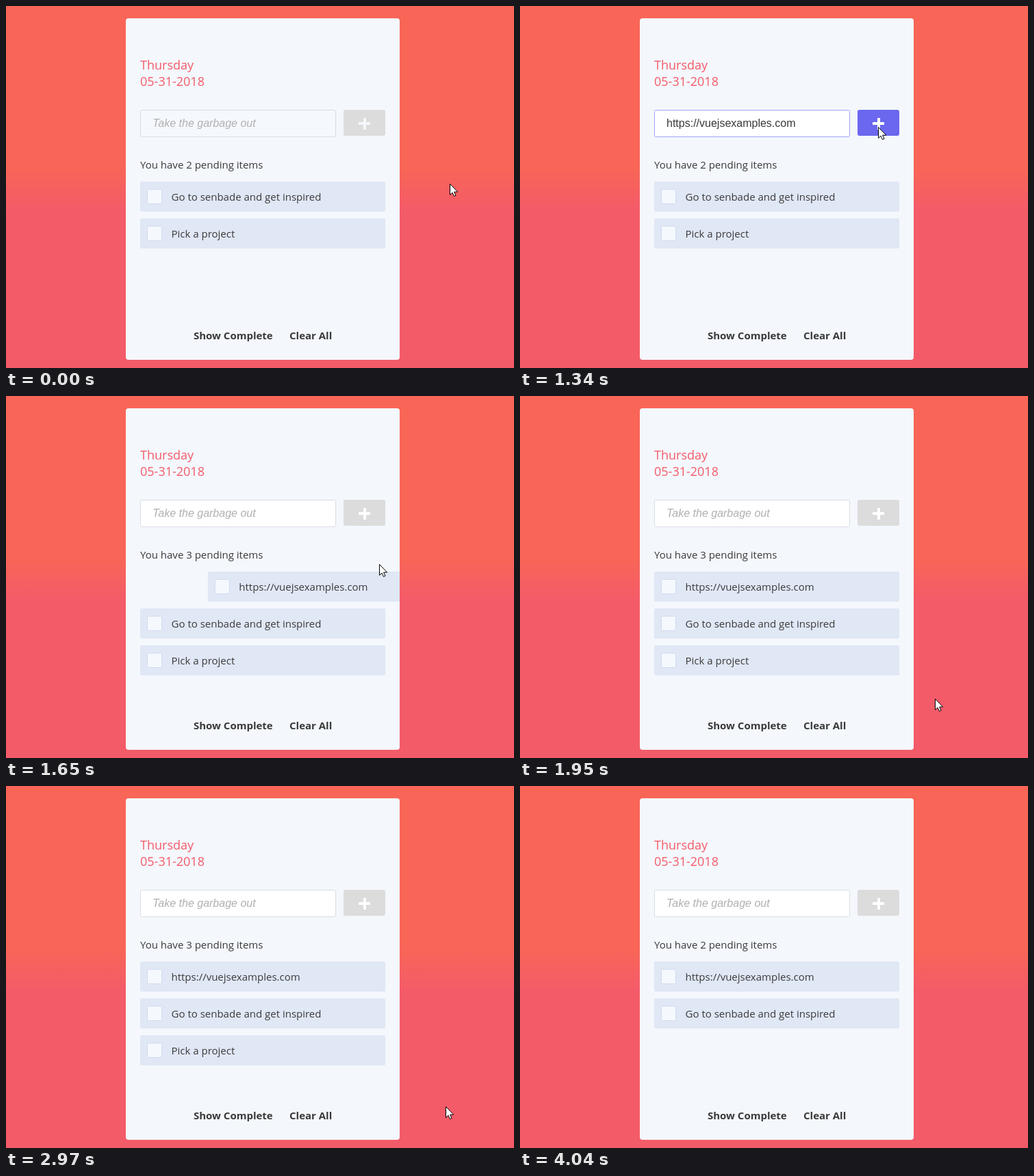
Write an HTML page with a canvas that moves like this. It is 742x530 px and loops after 4.19 s.

```html
<!DOCTYPE html>
<html lang="en">
<head>
<meta charset="utf-8">
<title>To-do list</title>
<style>
  html, body { margin: 0; width: 100%; height: 100%; overflow: hidden; }
  canvas { display: block; }
</style>
</head>
<body>
<canvas id="stage" width="742" height="530"></canvas>
<script>
const ctx = document.getElementById('stage').getContext('2d');
const CARD = '#f4f7fc', INK = '#3a3a3a', ROSE = '#f45b69';
const SANS = '"Open Sans", sans-serif', INPUT = '"Liberation Sans", Arial, sans-serif';

// Timing in ms: the picture rests for START, then refreshes once per STEP.
const LOOP = 4190, START = 280, STEP = 149;
const FOCUS = 570, PASTE = 1020, ADD = 1470, SETTLE = 1620, HOVER = 3250, REMOVE = 3400, GONE = 3700;

// Pointer stops: time, x, y
const STOPS = [[0, 648, 260], [START - STEP, 648, 260], [FOCUS, 432, 176], [876, 525, 183],
  [ADD, 523, 176], [1919, 606, 443], [2366, 620, 498], [2515, 685, 525], [2813, 682, 500],
  [HOVER, 534, 386], [REMOVE + STEP, 534, 386], [4000, 740, 560], [LOOP, 740, 560]];

const clamp = v => Math.min(1, Math.max(0, v));
const progress = (t, from, to) => clamp((t - from) / (to - from));
const within = (t, from, to) => t >= from && t < to;

function pointerAt(t) {
  const i = STOPS.findIndex(stop => stop[0] > t);
  const [t0, x0, y0] = STOPS[i - 1], [t1, x1, y1] = STOPS[i];
  const u = progress(t, t0, t1), eased = u * u * (3 - 2 * u);
  return [x0 + (x1 - x0) * eased, y0 + (y1 - y0) * eased];
}

function box(x, y, w, h, radius, fill, stroke) {
  const inset = stroke ? 0.5 : 0;
  ctx.beginPath();
  ctx.roundRect(x + inset, y + inset, w - 2 * inset, h - 2 * inset, radius);
  ctx.fillStyle = fill;
  ctx.fill();
  if (stroke) {
    ctx.strokeStyle = stroke;
    ctx.stroke();
  }
}

function text(str, x, y, font, color = INK) {
  ctx.font = font;
  ctx.fillStyle = color;
  ctx.fillText(str, x, y);
}

function background() {
  const sky = ctx.createLinearGradient(0, 238, 0, 300);
  sky.addColorStop(0, '#f96557');
  sky.addColorStop(1, ROSE);
  ctx.fillStyle = sky;
  ctx.fillRect(0, 0, 742, 530);
  box(175, 18, 400, 500, 4, CARD);
}

function form(t) {
  const focused = within(t, FOCUS, ADD);
  const filled = within(t, PASTE, ADD);
  const active = within(t, PASTE, SETTLE);
  box(196, 152, 286, 40, 2, t < FOCUS ? '#f5f8fd' : '#fff', focused ? '#a1a6f2' : '#d9dce2');
  if (filled) text('https://vuejsexamples.com', 214, 177, `16px ${INPUT}`);
  else text('Take the garbage out', 214, 177, `italic 16px ${INPUT}`, '#b0b0b0');
  if (focused && !filled) box(213, 164, 1, 17, 0, '#000');

  const plus = t < FOCUS ? CARD : '#fff';
  box(493, 152, 61, 38, 3, active ? '#6b67ef' : '#dcdcdc');
  box(515, 170, 17, 4, 0, plus);
  box(522, 164, 4, 17, 0, plus);
}

function trash(y) {
  box(510, y, 44, 44, [0, 2, 2, 0], '#f66168');
  box(530, y + 15, 4, 3, 1, '#fff');
  box(526.5, y + 16.5, 11, 2, 1, '#fff');
  box(528, y + 19, 8.5, 10, 1, '#fff');
}

function item(label, row, { dx = 0, alpha = 1, hover = false } = {}) {
  const y = 257 + row * 54;
  ctx.save();
  ctx.globalAlpha = alpha;
  ctx.translate(dx, 0);
  box(196, y, 358, 44, 2, '#e0e7f5');
  box(206, y + 11, 22, 22, 2, '#f5f8fd', '#d1dcf0');
  text(label, 241.5, y + 28, `15px ${SANS}`);
  if (hover) trash(y);
  ctx.restore();
}

function list(t) {
  const shift = t >= ADD ? 1 : 0;
  const enter = progress(t, ADD - 50, SETTLE + STEP);
  const leave = progress(t, REMOVE + 10, GONE);
  ctx.save();
  ctx.beginPath();
  ctx.rect(175, 18, 400, 500);
  ctx.clip();
  if (shift) {
    item('https://vuejsexamples.com', 0, { dx: 358 * (1 - enter) ** 1.5, alpha: clamp(enter * 3.5) });
  }
  item('Go to senbade and get inspired', shift);
  item('Pick a project', 1 + shift, { dx: 358 * leave ** 1.5, alpha: 1 - leave, hover: t >= HOVER });
  ctx.restore();
}

function pointer(t) {
  const [x, y] = pointerAt(t);
  const hand = within(t, HOVER, GONE);
  const shape = new Path2D(hand
    ? 'M2 1.5Q3.5 0 5 1.5V8Q6.5 7 8 8.5Q9.5 7.5 11 9.2Q14 8.5 14 11V16L12 19V22.5H4.5V20L-1.5 13Q-2 10.5 0 11L2 13Z'
    : 'M.5 .5V16.5L4 13.2L6.5 18.5L9 17.4L6.6 12.2H11.7Z');
  ctx.save();
  ctx.translate(Math.round(x), Math.round(y));
  ctx.fillStyle = '#fff';
  ctx.strokeStyle = '#000';
  ctx.fill(shape);
  ctx.stroke(shape);
  if (hand) ctx.stroke(new Path2D('M5 8V12M8 8.5V12M11 9.5V12.5'));
  ctx.restore();
}

function draw() {
  const now = performance.now() % LOOP;
  const t = now < START ? 0 : START + Math.floor((now - START) / STEP) * STEP;
  background();
  text('Thursday', 196, 93, `18px ${SANS}`, ROSE);
  text('05-31-2018', 196, 117, `18px ${SANS}`, ROSE);
  form(t);
  text(`You have ${within(t, ADD, REMOVE) ? 3 : 2} pending items`, 196, 238, `15px ${SANS}`);
  list(t);
  text('Show Complete', 274, 488, `bold 15px ${SANS}`);
  text('Clear All', 414, 488, `bold 15px ${SANS}`);
  pointer(t);
  requestAnimationFrame(draw);
}
draw();
</script>
</body>
</html>
```
